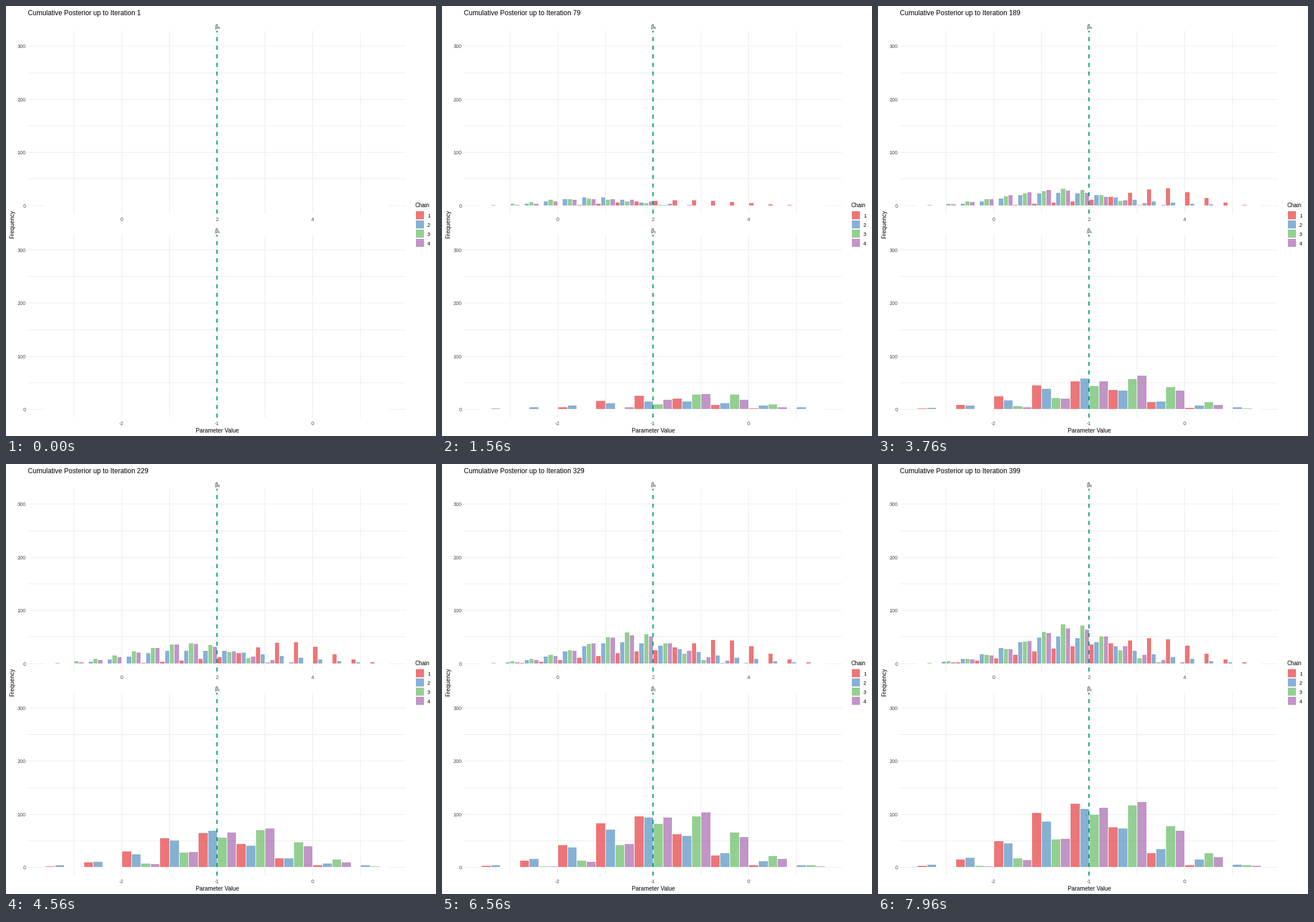
A matplotlib script for the animation above (8 s loop, 748 by 748 pixels).

```python
import math
import numpy as np
import matplotlib.pyplot as plt
from matplotlib.animation import FuncAnimation
from matplotlib.collections import PolyCollection
from matplotlib.colors import to_rgba

SIZE, DPI = 748, 100
PT = 72 / DPI                      # points per pixel
FRAMES, INTERVAL = 200, 40
GRID, TICK, TRUTH = "#EBEBEB", "#4D4D4D", "#009E73"
FILLS = [to_rgba(c, 0.6) for c in ("#E41A1C", "#377EB8", "#4DAF4A", "#984EA3")]

LEFT, RIGHT = 38, 696
BAR_X0, BAR_X1 = 68.05, 666.25     # extent of the histogram bins
UNIT = 0.924                       # pixels per count

# Each chain wanders through four phases; within a phase its draws are
# normal with the given (mean, spread), measured in bins.
PHASES = [0, 79, 149, 229, 399]
BETA_0 = [
    [(10.3, 3.1), (13.1, 1.6), (12.4, 1.8), (7.9, 2.8)],
    [(5.3, 1.9), (8.3, 1.9), (11.6, 2.6), (6.7, 2.6)],
    [(4.7, 2.3), (7.9, 1.4), (6.0, 2.0), (7.7, 1.8)],
    [(5.5, 2.3), (6.5, 2.5), (7.6, 2.1), (7.8, 2.1)],
]
BETA_1 = [
    [(4.2, 1.2), (3.1, 1.4), (3.8, 1.4), (3.7, 1.2)],
    [(4.5, 2.2), (4.0, 0.8), (3.2, 1.4), (3.9, 1.6)],
    [(5.5, 1.0), (4.2, 1.3), (4.5, 1.2), (4.6, 1.4)],
    [(5.0, 1.1), (4.7, 1.1), (4.2, 1.2), (4.6, 1.3)],
]
PANELS = [
    dict(top=43, bottom=361, zero=347.1, bins=18, sub="0",
         ticks=("0", "2", "4"), chains=BETA_0),
    dict(top=398, bottom=716, zero=701.65, bins=9, sub="1",
         ticks=("-2", "-1", "0"), chains=BETA_1),
]


def counts(chain, bins, it):
    """Cumulative draws per bin after `it` iterations."""
    b = np.arange(bins)
    total = np.zeros(bins)
    for start, end, (mean, spread) in zip(PHASES, PHASES[1:], chain):
        weight = np.exp(-0.5 * ((b - mean) / spread) ** 2)
        total += np.clip(it - start, 0, end - start) * weight / weight.sum()
    return np.rint(total)


def height_to_y(panel, count):
    return math.floor(panel["zero"] - UNIT * count) + 0.5


def bar(panel, b, k, count):
    w = (BAR_X1 - BAR_X0) / panel["bins"] / 4
    x0, x1 = (round(BAR_X0 + (4 * b + k + i) * w) + 0.5 for i in (0, 1))
    y0, y1 = height_to_y(panel, 0), height_to_y(panel, count)
    return [(x0, y0), (x0, y1), (x1, y1), (x1, y0)]


plt.rcParams["font.family"] = "Liberation Sans"
fig = plt.figure(figsize=(SIZE / DPI, SIZE / DPI), dpi=DPI, facecolor="white")
ax = fig.add_axes([0, 0, 1, 1])
ax.set(xlim=(0, SIZE), ylim=(SIZE, 0))
ax.axis("off")


def line(xs, ys, color=GRID, px=1, **kw):
    ax.plot(xs, ys, color=color, lw=px * PT, snap=False,
            solid_capstyle="butt", dash_capstyle="butt", **kw)


def label(x, y, s, px, color="black", ha="left", **kw):
    return ax.text(x, y, s, fontsize=px * PT, color=color, ha=ha, va="baseline", **kw)


for p in PANELS:
    for step in range(7):
        y = height_to_y(p, 50 * step)
        line([LEFT, RIGHT], [y, y])
        if step % 2 == 0:
            label(34.5, y + 3.5, str(50 * step), 9, TICK, "right")
    for step in range(7):
        x = round(117.9 + 83.08 * step) + 0.5
        line([x, x], [p["top"], p["bottom"]])
    for i, s in enumerate(p["ticks"]):
        label(201 + 166 * i, p["bottom"] + 13, s, 9, TICK, "center")
    # empty bins still leave a white outline along the baseline
    line([68, 667], [height_to_y(p, 0)] * 2, "white", zorder=2.5)
    line([367, 367], [p["bottom"], p["top"]], TRUTH, 2, ls=(0, (3.5, 4)), zorder=4)
    label(363.3, p["top"] - 4, "β", 8.8, "#1A1A1A")
    label(368.3, p["top"] - 3, p["sub"], 5.5, "#1A1A1A")

title = label(38, 16, "", 11.95)
label(367.5, 741.5, "Parameter Value", 10.1, ha="center")
label(14, 379.5, "Frequency", 10.4, ha="center", rotation=90, rotation_mode="anchor")
label(711.5, 350, "Chain", 9.8)
for k, fill in enumerate(FILLS):
    ax.add_patch(plt.Rectangle((713, 357 + 16 * k), 14, 14, fc=fill, lw=0))
    label(733, 368 + 16 * k, str(k + 1), 9)

bars = PolyCollection([], edgecolors="white", linewidths=PT, zorder=3, snap=False,
                      joinstyle="miter")
ax.add_collection(bars, autolim=False)


def update(frame):
    it = 2 * frame + 1
    title.set_text(f"Cumulative Posterior up to Iteration {it}")
    verts, colors = [], []
    for p in PANELS:
        heights = [counts(chain, p["bins"], it) for chain in p["chains"]]
        for b in range(p["bins"]):
            for k, fill in enumerate(FILLS):
                if heights[k][b] > 0:
                    verts.append(bar(p, b, k, heights[k][b]))
                    colors.append(fill)
    bars.set_verts(verts)
    bars.set_facecolor(colors)
    return bars, title


anim = FuncAnimation(fig, update, frames=FRAMES, interval=INTERVAL,
                     repeat=True, repeat_delay=0, blit=False)
plt.show()
```
